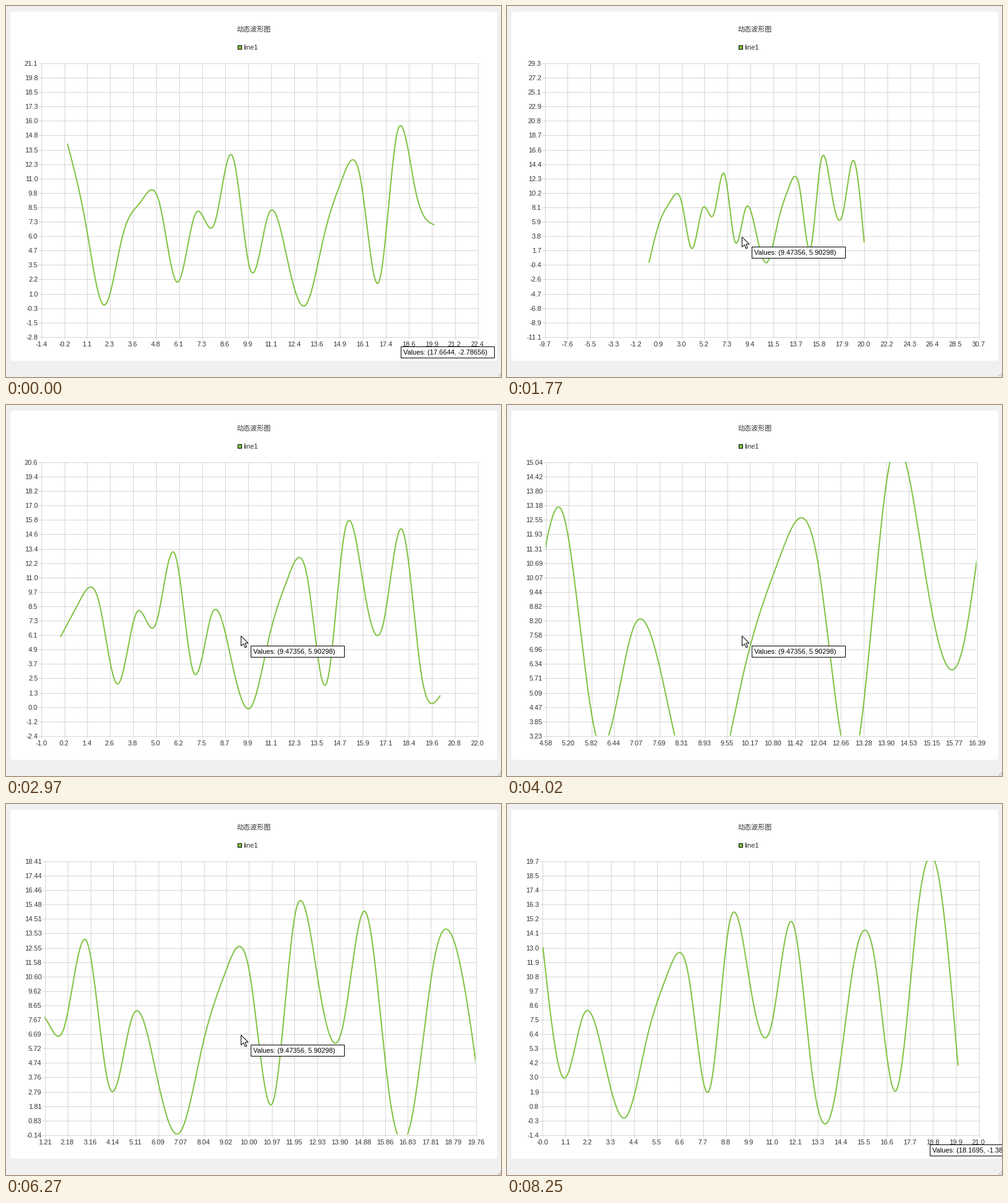
Write a matplotlib script that moves like this. It is 795 px wide and 595 px high and loops after 8.61 s.

```python
import matplotlib.pyplot as plt
import numpy as np
from matplotlib.animation import FuncAnimation
from matplotlib.collections import LineCollection
from matplotlib.patches import FancyBboxPatch, Polygon, Rectangle

W, H, DPI = 795, 595, 100
STEP, LOOP = 30, 8610
PX = 72 / DPI
GREEN, GRID, INK = "#80c342", "#d6d6d6", "#35322f"
TICKS = 20
TOP, BOTTOM = 91.4, 530.4

# One value enters per shift; 21 of them are visible at a time
DATA = [14, 7, 0, 6, 9, 9, 2, 8, 7, 13, 3, 8, 4, 0, 6,
        11, 11, 2, 15, 10, 7, 15, 3, 1, 12, 12, 2, 15, 19, 4]
VISIBLE = 21
SHIFTS = [300, 1290, 2310, 3300, 4410, 5340, 6330, 7260, 8250]

# Mouse wheel: out divides the range by 0.9, in divides it by 1.1
CENTER_X, CENTER_Y, RANGE = 10.485, 9.134, 23.84
ZOOM_OUT = [1050, 1110, 1200, 1560, 1770, 1890, 4410, 4500, 4560, 4890,
            5070, 5340, 5400, 6930, 6990, 7260]
ZOOM_IN = [2100, 2310, 2490, 2550, 2640, 2910, 2970, 3300, 3420, 3690, 3780,
           3900, 3900, 4020, 5940, 6000, 6270, 6420, 6480]

# Hover positions in chart values: time, x, y
HOVER = [
    (0, 17.6644, -2.78656), (180, 13.6638, -2.18406), (240, 11.6226, 0.698113),
    (300, 10.2959, 2.38521), (570, 10.1258, 2.87547), (630, 9.95575, 3.5283),
    (690, 9.78566, 4.23585), (750, 9.64956, 4.94339), (840, 9.54751, 5.48774),
    (900, 9.47356, 5.90298), (7590, 10.4432, 5.39172), (7650, 12.5721, 3.23585),
    (7710, 15.8453, 0.312736), (7800, 18.1695, -1.38391),
]
# Cursor below the plot, where the tooltip no longer follows
OUTSIDE = [(120, 180, 560, 575), (7800, 7860, 715, 576)]
CURSOR_SPAN = (120, 7860)
ARROW = np.array([(0, 0), (0, 16), (4, 12.5), (6.5, 18.5),
                  (9, 17.5), (6.5, 11.5), (11.5, 11.5)])


def count(times, t):
    return sum(s <= t for s in times)


def span_at(t):
    return RANGE / 0.9 ** count(ZOOM_OUT, t) / 1.1 ** count(ZOOM_IN, t)


def label_width(text):
    return sum(6 if c.isdigit() else 4 for c in text)


class View:
    """Axis limits, tick labels and plot rectangle at one moment."""

    def __init__(self, t):
        self.span = span_at(t)
        unit = np.linspace(-0.5, 0.5, TICKS) * self.span
        digits = 2 if self.span < TICKS - 1 else 1
        self.xlabels = [f"{v:.{digits}f}" for v in CENTER_X + unit]
        self.ylabels = [f"{v:.{digits}f}" for v in CENTER_Y + unit]
        self.left = 34.2 + max(map(label_width, self.ylabels))
        self.right = 768.2 - label_width(self.xlabels[-1]) / 2
        self.xticks = np.floor(np.linspace(self.left, self.right, TICKS)) + 0.5
        self.yticks = np.floor(np.linspace(BOTTOM, TOP, TICKS)) + 0.5

    def pixel(self, x, y):
        kx = (self.right - self.left) / self.span
        ky = (BOTTOM - TOP) / self.span
        px = (self.left + self.right) / 2 + (x - CENTER_X) * kx
        py = (TOP + BOTTOM) / 2 - (y - CENTER_Y) * ky
        return px, py


def natural_spline(values, per_segment=24):
    y = np.array(values, float)
    n = len(y)
    m = np.eye(n)
    rhs = np.zeros(n)
    for i in range(1, n - 1):
        m[i, i - 1:i + 2] = 1, 4, 1
        rhs[i] = 6 * (y[i - 1] - 2 * y[i] + y[i + 1])
    bend = np.linalg.solve(m, rhs)
    x = np.linspace(0, n - 1, (n - 1) * per_segment + 1)
    i = np.minimum(x.astype(int), n - 2)
    b = x - i
    a = 1 - b
    curve = a * y[i] + b * y[i + 1]
    curve += ((a ** 3 - a) * bend[i] + (b ** 3 - b) * bend[i + 1]) / 6
    return x, curve


CURVES = [natural_spline(DATA[s:s + VISIBLE]) for s in range(len(SHIFTS) + 1)]

fig = plt.figure(figsize=(W / DPI, H / DPI), dpi=DPI, facecolor="#f0f0f0")
ax = fig.add_axes([0, 0, 1, 1])
ax.set_xlim(0, W)
ax.set_ylim(H, 0)
ax.axis("off")


def text(x, y, s="", color=INK, font="Liberation Sans", **kw):
    return ax.text(x, y, s, color=color, family=font, fontsize=11 * PX, **kw)


def box(x, y, w, h, fill, edge="black", **kw):
    patch = Rectangle((x, y), w, h, facecolor=fill, edgecolor=edge,
                      linewidth=PX, **kw)
    return ax.add_patch(patch)


ax.add_patch(FancyBboxPatch((7, 9), 782, 560, linewidth=0, facecolor="white",
                            boxstyle="round,pad=0,rounding_size=5"))
text(397.5, 37, "动态波形图", font="Noto Sans CJK JP",
     ha="center", va="center_baseline")
box(371.5, 62.5, 6, 6, GREEN)
text(381, 70, "line1")
for gx, gy in [(793, 589), (790, 592), (793, 592)]:
    box(gx, gy, 2, 2, "#bfbfbf", "none")

grid = LineCollection([], colors=GRID, linewidths=PX, zorder=2)
ax.add_collection(grid, autolim=False)
curve, = ax.plot([], [], color=GREEN, linewidth=2 * PX, zorder=3)
xtexts = [text(0, 546, ha="center", zorder=4) for _ in range(TICKS)]
ytexts = [text(0, 0, ha="right", zorder=4) for _ in range(TICKS)]
tip = box(0, 0, 150, 18, "white", zorder=5)
tip_text = text(0, 0, color="black", zorder=6, clip_on=False)
cursor = Polygon(ARROW, closed=True, facecolor="white", edgecolor="black",
                 linewidth=PX, zorder=7)
ax.add_patch(cursor)


def draw_axes(view):
    lines = [[(x, TOP), (x, BOTTOM + 4)] for x in view.xticks]
    lines += [[(view.left - 4, y), (view.right + 0.5, y)] for y in view.yticks]
    grid.set_segments(lines)
    for label, x, s in zip(xtexts, view.xticks, view.xlabels):
        label.set_x(x)
        label.set_text(s)
    for label, y, s in zip(ytexts, view.yticks, view.ylabels):
        label.set_position((view.left - 5, y + 4.5))
        label.set_text(s)


def draw_curve(view, t):
    x, y = CURVES[count(SHIFTS, t)]
    px, py = view.pixel(x, y)
    curve.set_data(px + 0.5, py + 0.5)
    curve.set_clip_path(Rectangle((view.left, TOP), view.right - view.left,
                                  BOTTOM - TOP, transform=ax.transData))


def draw_pointer(t):
    start, vx, vy = [h for h in HOVER if h[0] <= t][-1]
    px, py = (round(v) for v in View(start).pixel(vx, vy))
    tip.set_xy((px + 15.5, py + 15.5))
    tip_text.set_position((px + 20, py + 29))
    tip_text.set_text(f"Values: ({vx:g}, {vy:g})")
    for begin, end, ox, oy in OUTSIDE:
        if begin <= t < end:
            px, py = ox, oy
    cursor.set_xy(ARROW + (px + 0.5, py + 0.5))
    cursor.set_visible(CURSOR_SPAN[0] <= t < CURSOR_SPAN[1])


def update(frame):
    t = frame * STEP
    view = View(t)
    draw_axes(view)
    draw_curve(view, t)
    draw_pointer(t)
    return [grid, curve, *xtexts, *ytexts, tip, tip_text, cursor]


anim = FuncAnimation(fig, update, frames=LOOP // STEP, interval=STEP,
                     repeat=True, repeat_delay=0, blit=False)
plt.show()
```
